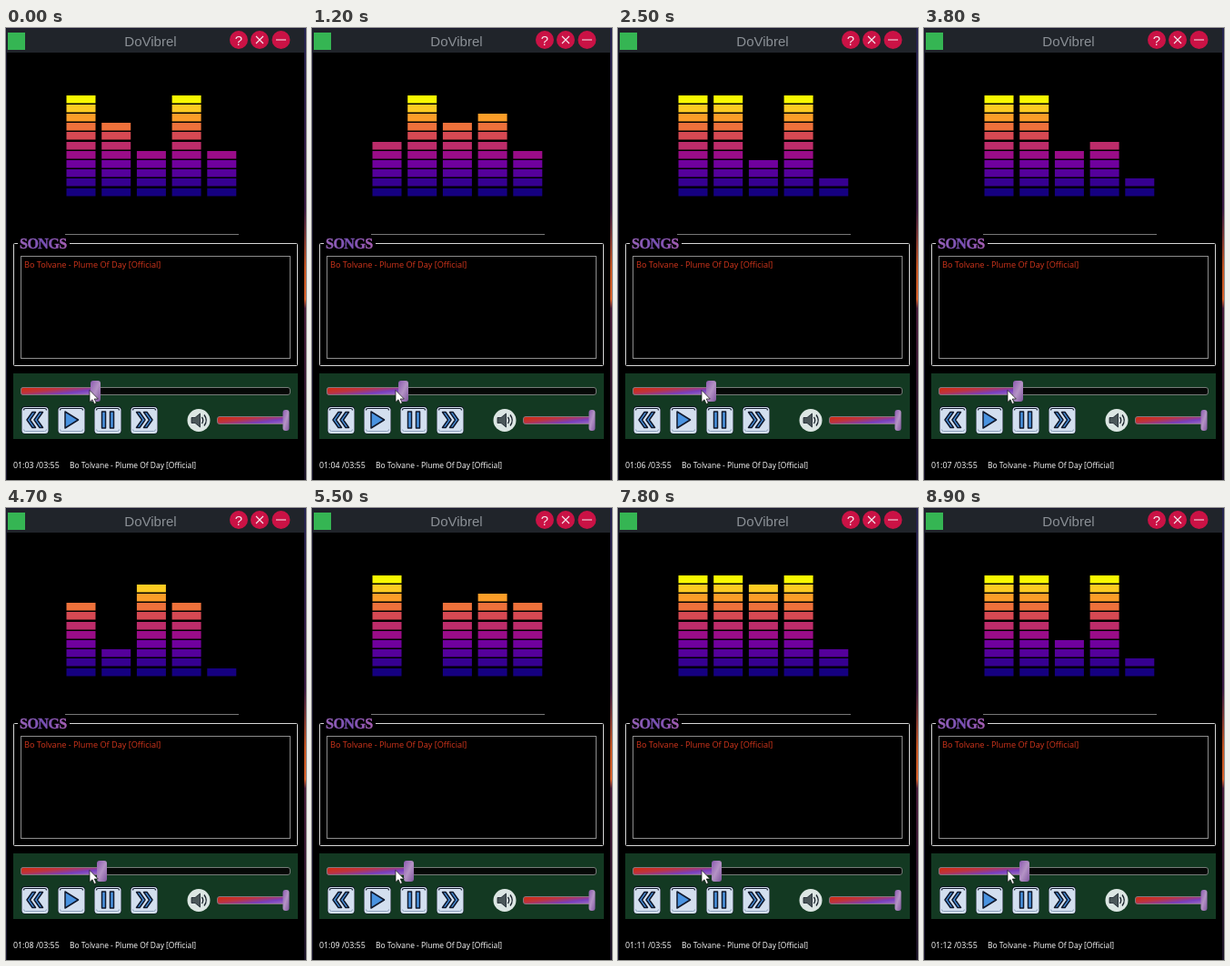
Animation, 330 px wide and 496 px high, one loop 9 s. Source, as an HTML page:

```html
<!DOCTYPE html>
<html lang="en">
<head>
<meta charset="utf-8">
<title>Music player</title>
<style>
  html, body { margin: 0; width: 100%; height: 100%; overflow: hidden; background: #000; }
  svg { display: block; width: 330px; height: 496px; }
  text { white-space: pre; }
  .ui { font-family: "Open Sans", "Noto Sans", sans-serif; font-weight: 500; }
  .head { font: 15px "Liberation Sans", Arial, sans-serif; fill: #8b9096; }
  .songs { font: bold 16px "Liberation Serif", "Noto Serif", serif; letter-spacing: -.5px; }
  .icon { fill: #4a93e0; stroke: #10182c; stroke-width: 1.5; stroke-linejoin: round; }
  .sign { fill: none; stroke: #f6e8ee; stroke-width: 1.1; }
</style>
</head>
<body>
<svg viewBox="0 0 330 496" xmlns="http://www.w3.org/2000/svg">
  <defs>
    <linearGradient id="fill" x1="0" y1=".2" x2="1" y2="1">
      <stop offset="0" stop-color="#cf2c16"/>
      <stop offset=".3" stop-color="#bd3440"/>
      <stop offset=".65" stop-color="#783fbe"/>
      <stop offset="1" stop-color="#a276c4"/>
    </linearGradient>
    <linearGradient id="knob" x2="1" y2="1">
      <stop offset="0" stop-color="#8c5ab0"/>
      <stop offset=".5" stop-color="#b493c5"/>
      <stop offset="1" stop-color="#80569f"/>
    </linearGradient>
    <linearGradient id="title">
      <stop offset="0" stop-color="#9a62b8"/>
      <stop offset=".5" stop-color="#7750b4"/>
      <stop offset="1" stop-color="#a75fb4"/>
    </linearGradient>
    <linearGradient id="edge" x2="0" y2="1">
      <stop offset="0" stop-color="#25234f"/>
      <stop offset=".4" stop-color="#3a1a44"/>
      <stop offset=".53" stop-color="#c4521f"/>
      <stop offset=".6" stop-color="#d8602a"/>
      <stop offset=".62" stop-color="#4a1c3c"/>
      <stop offset="1" stop-color="#1c1428"/>
    </linearGradient>
    <g id="key">
      <rect x=".5" y=".5" width="30" height="30.500" rx="4" fill="#0d1420"/>
      <rect x="1" y="1.500" width="29" height="29" rx="3.500" fill="#d3dfef"/>
      <path d="M3 5Q3 3 5 3H26Q28 3 28 5" fill="none" stroke="#141c2d" stroke-width="1.200"/>
      <path d="M3 26Q3 28 5 28H26Q28 28 28 26" fill="none" stroke="#8fa2bd"/>
    </g>
    <path id="skip" d="M7 7h3.500l6 8.500-6 8.500H7l6-8.500zM15 7h3.500l6 8.500-6 8.500H15l6-8.500z"/>
  </defs>

  <rect width="330" height="496"/>
  <path d="M.5 496V.5H330" fill="none" stroke="#1d1a33"/>
  <rect x="1" y="1" width="327" height="26" fill="#20242a"/>
  <rect x="328" width="2" height="496" fill="url(#edge)"/>
  <rect x="2" y="5" width="19" height="19" fill="#35b553"/>
  <text class="head" x="159" y="19.500" text-anchor="middle">DoVibrel</text>
  <g fill="#ca1245">
    <circle cx="256" cy="13" r="10"/>
    <circle cx="279" cy="13" r="10"/>
    <circle cx="302.500" cy="13" r="10"/>
  </g>
  <text x="256" y="18.500" text-anchor="middle" font-size="15" font-family="Liberation Sans, sans-serif" fill="#f6e8ee">?</text>
  <path class="sign" d="M275 9l8 8M283 9l-8 8M297 13h11"/>

  <g id="bars"></g>

  <path d="M65 226.500H256" stroke="#777"/>
  <path d="M13 236.500H9.500Q8.500 236.500 8.500 237.500V369.500Q8.500 370.500 9.500 370.500H319.500Q320.500 370.500 320.500 369.500V237.500Q320.500 236.500 319.500 236.500H70" fill="none" stroke="#d6d6d6"/>
  <text class="songs" x="15" y="242" fill="url(#title)" stroke="url(#title)" stroke-width=".4">SONGS</text>
  <rect x="16.500" y="250.500" width="296" height="112" fill="none" stroke="#8c8c8c"/>
  <text class="ui" x="20" y="262.500" font-size="9.150" fill="#d4361c">Bo Tolvane - Plume Of Day [Official]</text>

  <rect x="8" y="379" width="313" height="72" fill="#133922"/>
  <rect x="16.500" y="394.500" width="296" height="8" rx="2.500" fill="#050706" stroke="#777c79"/>
  <rect id="done" x="16.500" y="394.500" height="8" rx="2.500" fill="url(#fill)" stroke="#85757f"/>
  <rect id="grip" y="387" width="11" height="23" rx="3" fill="url(#knob)"/>

  <g transform="translate(16.500 414.500)">
    <use href="#key"/>
    <use href="#skip" class="icon" transform="matrix(-1 0 0 1 31 0)"/>
  </g>
  <g transform="translate(56.500 414.500)">
    <use href="#key"/>
    <path class="icon" d="M8.500 6.500L23 15.500 8.500 24.500z"/>
  </g>
  <g transform="translate(96.500 414.500)">
    <use href="#key"/>
    <path class="icon" d="M9 6.500h4v18H9zM18 6.500h4v18h-4z"/>
  </g>
  <g transform="translate(136.500 414.500)">
    <use href="#key"/>
    <use href="#skip" class="icon"/>
  </g>

  <circle cx="212" cy="430.500" r="12.500" fill="#dce6e3"/>
  <path d="M204 427.500h4l5.500-4.500v15l-5.500-4.500h-4z" fill="#4b5759" stroke="#17202a" stroke-width=".8"/>
  <path d="M215.500 427q2.500 3.500 0 7M218 424.500q4.500 6 0 12" fill="none" stroke="#17202a" stroke-width="1.300"/>
  <rect x="232.500" y="426.500" width="78" height="8" rx="2.500" fill="url(#fill)" stroke="#85757f"/>
  <rect x="304.500" y="419" width="7" height="23" rx="3" fill="url(#knob)"/>

  <path d="M92 397.500v13l3-2.700 2.100 4.700 2.200-1-2.100-4.500h4.100z" fill="#fff" stroke="#111" stroke-width=".7"/>
  <g class="ui" fill="#fff">
    <text id="clock" x="8" y="483" font-size="8.850"></text>
    <text x="70" y="483" font-size="8.450">Bo Tolvane - Plume Of Day [Official]</text>
  </g>
</svg>
<script>
const LOOP = 9000, STEP = 100, ROWS = 11;
const colors = ["#150080", "#360091", "#55009b", "#70009e", "#9a0c88", "#bd2c6a",
                "#d64953", "#ee713b", "#fb9d28", "#fdcb22", "#f8f800"];
// Step, then the height of each of the five columns.
const poses = [
  [0, 11, 8, 5, 11, 5],
  [12, 6, 11, 8, 9, 5],
  [25, 11, 11, 4, 11, 2],
  [38, 11, 11, 5, 6, 2],
  [55, 11, 0, 8, 9, 8],
  [67, 11, 5, 8, 9, 3],
  [89, 11, 11, 4, 11, 2],
  [90, 11, 8, 5, 11, 5]
];
const $ = id => document.getElementById(id);

const columns = [66.5, 105.2, 143.9, 182.6, 221.3].map(x =>
  colors.map((color, row) => {
    const rect = document.createElementNS("http://www.w3.org/2000/svg", "rect");
    const box = { x, y: Math.round(175.6 - row * 10.2), width: 32, height: 8.5, fill: color };
    for (const key in box) rect.setAttribute(key, box[key]);
    return $("bars").appendChild(rect);
  }));

// Columns bounce freely between poses and settle at each one.
function level(col, step) {
  const i = poses.findIndex(p => p[0] > step);
  const from = poses[i - 1], to = poses[i];
  const u = (step - from[0]) / (to[0] - from[0]);
  const calm = Math.min(1, (step - from[0]) / 3, (to[0] - step) / 3);
  const bounce = 4 * Math.sin(step * (0.75 + 0.13 * col) + col * 2);
  const base = from[col + 1] + (to[col + 1] - from[col + 1]) * u;
  return Math.max(0, Math.min(ROWS, Math.round(base + bounce * calm)));
}

function draw(time) {
  const step = Math.floor(time % LOOP / STEP);
  columns.forEach((rects, col) => {
    const height = level(col, step);
    rects.forEach((rect, row) => rect.setAttribute("visibility", row < height ? "visible" : "hidden"));
  });

  const seconds = 63 + Math.floor((step * STEP + 650) / 1000);
  const center = 19 + seconds * 296 / 235;
  $("grip").setAttribute("x", Math.round(center - 5));
  $("done").setAttribute("width", center - 16.5);
  const label = `01:${String(seconds - 60).padStart(2, "0")} /03:55`;
  if ($("clock").textContent !== label) $("clock").textContent = label;
}

function tick() {
  draw(performance.now());
  requestAnimationFrame(tick);
}
tick();
</script>
</body>
</html>
```
